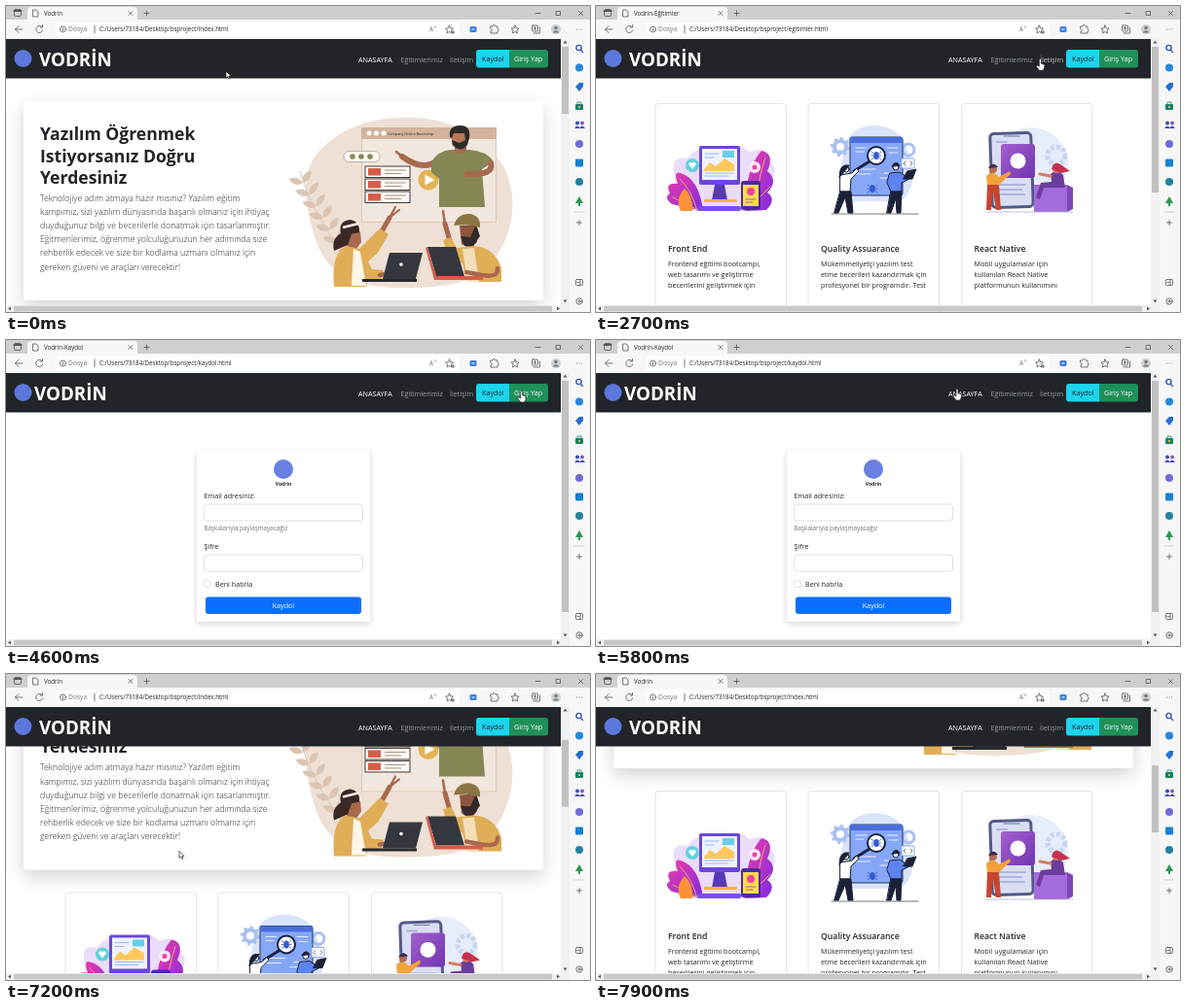
Animation, 600 px wide and 315 px high, one loop 8 s. Source, as an HTML page:

```html
<!DOCTYPE html>
<html lang="tr">
<head>
<meta charset="utf-8">
<title>Browser walkthrough</title>
<style>
  html, body { margin: 0; height: 100%; overflow: hidden; background: #fff; }
  svg { display: block; width: 600px; height: 315px; }
  text { font: 7.2px "Open Sans", "Noto Sans", sans-serif; fill: #212529; }
  .brand { font-size: 18.8px; font-weight: 700; fill: #fff; }
  .title text { font-size: 17.6px; font-weight: 700; }
  .lead text { font-size: 8.75px; font-weight: 300; fill: #212529; }
  .head { font-size: 8.7px; font-weight: 600; }
  .small { font-size: 6.2px; }
  .muted { fill: #6c757d; }
  .white { fill: #fff; }
  .nav { fill: #9b9d9f; }
  .line { fill: none; stroke: #555; stroke-width: .8; stroke-linecap: round; stroke-linejoin: round; }
  .skin { stroke: #a8694e; fill: none; stroke-linecap: round; stroke-linejoin: round; }
  .field { fill: #fff; stroke: #d5d9dd; stroke-width: .8; }
  .card { fill: #fff; stroke: #dfdfdf; stroke-width: .8; }
</style>
</head>
<body>
<svg viewBox="0 0 600 315">
  <defs>
    <clipPath id="view"><rect y="74" width="570" height="234"/></clipPath>
    <filter id="shadow" x="-20%" y="-20%" width="140%" height="150%">
      <feDropShadow dx="0" dy="7" stdDeviation="9" flood-opacity=".17"/>
    </filter>
    <filter id="softShadow" x="-20%" y="-20%" width="140%" height="140%">
      <feDropShadow dx="0" dy="2" stdDeviation="3" flood-opacity=".17"/>
    </filter>
    <linearGradient id="violet" x2="1" y2="1"><stop stop-color="#a45fd0"/><stop offset="1" stop-color="#7136ae"/></linearGradient>
    <linearGradient id="magenta" x2="1" y2="1"><stop stop-color="#f43ca8"/><stop offset="1" stop-color="#7a2be0"/></linearGradient>
    <path id="leaflet" d="M0 0C3-5 10-6 15-1 10 3 5 4 0 0Z"/>
  </defs>

  <rect width="600" height="315" fill="#fff"/>

  <g clip-path="url(#view)">
    <g id="hero">
      <rect x="18" y="98" width="534" height="205" rx="4" fill="#fff" filter="url(#shadow)"/>
      <g class="title"><text x="35" y="137.500">Yazılım Öğrenmek</text><text x="35" y="160.500">Istiyorsanız Doğru</text><text x="35" y="182.800">Yerdesiniz</text></g>
      <g class="lead" id="lead"></g>

      <path d="M308 182C309 148 352 116 404 115 453 113 490 132 510 163 529 197 521 241 495 268 478 288 441 290 405 290 365 290 335 279 322 250 313 229 308 207 308 182Z" fill="#eee0d4"/>
      <g id="fern" fill="#dac5b5"><path d="M302 170Q315 214 346 254" fill="none" stroke="#dac5b5"/></g>

      <rect x="365.500" y="125.500" width="138" height="97" fill="#f1e7de" stroke="#d8c3b2" stroke-width=".8"/>
      <rect x="365" y="125" width="139" height="12" fill="#d3b39d"/>
      <g fill="#fff"><circle cx="373" cy="131" r="2.500"/><circle cx="380.500" cy="131" r="2.500"/><circle cx="388" cy="131" r="2.500"/></g>
      <text x="392" y="132.500" style="font-size:3.700px">Company Online Bootcamp</text>
      <rect x="347" y="149.500" width="37" height="11" rx="5.500" fill="#fffaf4" stroke="#9a8c79" stroke-width=".6"/>
      <g fill="#878959"><circle cx="356" cy="155" r="2.800"/><circle cx="365" cy="155" r="2.800"/><circle cx="374" cy="155" r="2.800"/></g>
      <g id="rows"></g>
      <circle cx="434" cy="179" r="10.500" fill="#e3b355"/><path d="M430.500 173.500V184.500L440.500 179Z" fill="#fff"/>

      <path d="M442 160Q428 170 407 155" class="skin" stroke-width="6"/>
      <path d="M408 156L401 150" class="skin" stroke-width="2.500"/>
      <path d="M437 161Q443 149 457 148H476Q493 149 501 160L489 168 492 207H445V178L437 171Z" fill="#858755"/>
      <path d="M498 162Q502 174 474 173" class="skin" stroke-width="6"/>
      <path d="M461 144H473V149Q467 155 461 149Z" fill="#a8694e"/>
      <path d="M458 129H474V142Q466 154 458 142Z" fill="#b87858"/>
      <path d="M456 135Q454 124 465 123 478 122 476 136L474 143Q467 152 459 143L458 138 466 141 472 138 471 131H460L458 136Z" fill="#2e2a2a"/>

      <path d="M380 243L394 218" class="skin" stroke-width="5"/><path d="M394 218L400 207M394 218L404 210" class="skin" stroke-width="2.200"/>
      <path d="M353 236L364 232 365 243 358 253 350 248Z" fill="#a8694e"/>
      <path d="M337 252Q334 240 344 234 341 221 354 220 364 222 363 233L355 235 351 246Z" fill="#3a2826"/>
      <path d="M346 228L362 224" stroke="#fff3e4" stroke-width="2.500"/>
      <path d="M337 289Q334 254 349 247L363 250 384 229 393 235 382 254 372 263 376 271 388 272 386 281 371 283 370 289Z" fill="#e0ae57"/>
      <path d="M357 250L364 253 370 288H355Z" fill="#fff6e9"/>
      <path d="M384 277L392 276" class="skin" stroke-width="4.500"/>
      <path d="M394 254H428L421 281H387Z" fill="#34383e"/><path d="M366 281H422V284H366Z" fill="#262a30"/><circle cx="406" cy="266" r="1.800" fill="#fff"/>

      <path d="M456 242L451 224" class="skin" stroke-width="5"/><path d="M451 224L449 211" class="skin" stroke-width="2.500"/>
      <path d="M466 226L483 225 484 243 477 250 468 245Z" fill="#8e543e"/>
      <path d="M467 237L477 238 483 225 487 237 480 247 471 247Z" fill="#33292a"/>
      <path d="M460 226Q464 213 477 214 488 216 487 228L473 225Z" fill="#8b7643"/>
      <path d="M449 241L457 238 463 249 480 247Q502 248 509 270V284H474L469 265 455 260Z" fill="#e0ae57"/>
      <path d="M469 250L481 249 486 284H474Z" fill="#f2dfba"/>
      <path d="M505 270Q506 280 489 277L473 274" class="skin" stroke-width="4.500"/>
      <path d="M433 248H462L471 278H442Z" fill="#34383e"/><path d="M433 248L442 278H490V282H440L431 249Z" fill="#d45f4b"/>
    </g>

    <g id="cards">
      <g id="cardFrames"></g>

      <g id="frontArt">
        <path d="M80 190Q77 174 94 177 103 163 119 169 145 157 157 170 180 163 178 180 190 190 177 203L170 231H86Z" fill="#eadcfb"/>
        <g fill="url(#magenta)">
          <path d="M110 231Q106 198 87 192 79 189 84 203 70 201 76 213 69 217 78 224 76 231Z"/>
          <path d="M153 231Q153 188 170 169 184 172 176 190 188 200 176 212 186 219 175 230Z"/>
        </g>
        <path d="M104 231Q98 209 86 198M79 217L103 229M163 229Q167 196 174 176M163 222L179 206" class="line" style="stroke:#ffc24f"/>
        <path d="M87 231Q81 218 91 208 100 215 99 231Z" fill="#fb9138"/>
        <rect x="106" y="164" width="42" height="40" rx="2" fill="#6b46da"/><rect x="109" y="167" width="36" height="32" fill="#eef3ff"/>
        <path d="M112 172H126M112 176H121M112 192H141M112 195H136" class="line" style="stroke:#80a6ff"/>
        <path d="M111 188L117 181 123 185 132 177 142 183V190H111Z" fill="#ffc75d"/>
        <rect x="130" y="169" width="12" height="7" fill="#67cfe8"/>
        <path d="M122 204H132L135 220H119Z" fill="#553ab8"/><rect x="111" y="219" width="34" height="3" rx="1" fill="#ffb13d"/>
        <rect x="104" y="226" width="45" height="5" rx="2" fill="#7951e6"/>
        <rect x="149" y="200" width="20" height="30" rx="3" fill="#4a2c9e"/><rect x="151" y="204" width="16" height="22" fill="#ffdb4d"/><circle cx="159" cy="211" r="4" fill="#ee429d"/>
        <path d="M154 219H164M154 222H161" class="line" style="stroke:#8147d8"/>
        <circle cx="99" cy="184" r="7" fill="#62d3dd"/><path d="M99 188L95 183Q97 179 99 182 101 179 103 183Z" fill="#fff"/>
        <circle cx="163" cy="186" r="6" fill="#ffe8f6"/><circle cx="163" cy="186" r="2.500" fill="#ee429d"/>
      </g>

      <g id="testArt">
        <path d="M255 170Q258 145 284 143 313 143 320 168 334 204 313 221H258Q246 200 255 170Z" fill="#d9e4fb"/>
        <g fill="none" stroke="#a9c0f3"><circle cx="251" cy="165" r="6" stroke-width="4"/><circle cx="251" cy="165" r="8.500" stroke-width="3" stroke-dasharray="3 3.600"/><circle cx="321" cy="168" r="6" stroke-width="3"/></g>
        <rect x="261" y="155" width="54" height="60" rx="2" fill="#86a7f7" stroke="#25345e"/><rect x="261" y="155" width="54" height="6" fill="#4a6edb"/>
        <path d="M267 166H278M267 170H275M267 188H287M267 193H282M299 166H310M301 171H310M296 192H309M292 197H307" class="line" style="stroke:#fff"/>
        <path d="M281 180L265 190" class="line" style="stroke:#172242;stroke-width:3"/>
        <circle cx="288" cy="174" r="9" fill="#fff" stroke="#172242" stroke-width="2"/>
        <g id="bug"><ellipse cx="288" cy="174" rx="2.700" ry="4" fill="#355bd0"/><path d="M283 170L293 178M293 170L283 178M283 174H293" class="line" style="stroke:#355bd0"/></g>
        <use href="#bug" y="34" x="-4"/>
        <rect x="314" y="177" width="13" height="10" rx="1" fill="#fff" stroke="#8ea8ef"/><path d="M318 180L316 182 318 184.500M323 180L325 182 323 184.500" class="line"/>
        <path d="M242 234H331" class="line"/>
        <g class="line" style="stroke:#1b2137;stroke-width:1">
          <path d="M251 194L263 192 268 187 270 190 262 198 261 211H251Z" fill="#fff"/><path d="M251 211H262L264 233H259L256 217 249 233H245Z" fill="#1b2137"/>
          <circle cx="257" cy="188" r="3" fill="#fff"/><path d="M250 196Q250 182 260 184L258 187Z" fill="#1b2137"/>
          <path d="M302 192L312 191 322 198 314 202V211H303L299 202Z" fill="#5b84f0"/><path d="M303 211H314L313 233H309L308 218 303 233H299Z" fill="#1b2137"/>
          <circle cx="308" cy="186" r="3" fill="#fff"/><path d="M304 185Q308 178 312 184Z" fill="#1b2137"/>
          <path d="M320 190L329 188 325 198H316Z" fill="#1b2137"/>
        </g>
      </g>

      <g id="mobileArt">
        <circle cx="447" cy="183" r="38" fill="#e6edfb"/><circle cx="473" cy="174" r="9" fill="none" stroke="#c9d6ef" stroke-width="5" stroke-dasharray="4 2"/>
        <rect x="406" y="151" width="42" height="76" rx="4" fill="#d9def4" stroke="#535a86" stroke-width="3" transform="rotate(-2 427 189)"/><path d="M419 154H435" class="line" style="stroke:#535a86"/>
        <path d="M412 204H441M412 209H437M412 214H440M412 160H422" class="line" style="stroke:#aeb6dc;stroke-width:2"/>
        <rect x="416" y="162" width="35" height="35" rx="3" fill="url(#violet)"/><circle cx="433.500" cy="179.500" r="8" fill="#fff"/>
        <path d="M401 195Q407 188 414 196L425 190 426 193 414 204H402Z" fill="#f2a13a"/><circle cx="408" cy="188" r="4" fill="#b66b50"/><path d="M403 187Q408 179 413 186Z" fill="#382b51"/>
        <path d="M402 204H414L416 230H411L408 211 406 230H401Z" fill="#c7452e"/>
        <rect x="450" y="204" width="34" height="28" fill="#a46bdc"/><path d="M484 204L490 207V229L484 232Z" fill="#7e45b8"/>
        <path d="M467 193Q473 187 480 194L482 207H460L456 219 452 217 457 202 468 201Z" fill="#6b3d9a"/><path d="M467 195L456 193" class="line" style="stroke:#d77b68;stroke-width:3"/>
        <circle cx="473" cy="188" r="4" fill="#d77b68"/><path d="M468 188Q470 179 477 183L487 190 478 192Z" fill="#c7324a"/>
        <path d="M401 232H490" class="line" style="stroke:#aab2d2"/>
      </g>
    </g>

    <g id="signup">
      <rect x="196" y="114" width="178" height="176" rx="3" fill="#fff" filter="url(#softShadow)"/>
      <circle cx="285" cy="133" r="10" fill="#6880df"/>
      <text x="285" y="150" text-anchor="middle" style="font-size:5px;font-weight:700">Vodrin</text>
      <text x="203.500" y="162.500">Email adresiniz:</text><rect class="field" x="203.500" y="169" width="163" height="17" rx="3"/>
      <text x="203.500" y="195.800" class="muted" style="font-size:6.300px">Başkalarıyla paylaşmayacağız</text>
      <text x="203.500" y="214.500">Şifre</text><rect class="field" x="203.500" y="221" width="163" height="17" rx="3"/>
      <rect class="field" x="203.500" y="247.500" width="7" height="7" rx="2"/><text x="215" y="254">Beni hatırla</text>
      <rect x="205" y="264.500" width="160" height="17.500" rx="3" fill="#0d6efd"/><text x="285" y="276" text-anchor="middle" class="white">Kaydol</text>
    </g>
  </g>

  <rect y="34" width="570" height="40.500" fill="#212529"/>
  <circle cx="17.500" cy="54" r="9" fill="#5d77dc"/>
  <text id="brand" class="brand" y="61.500">VODRİN</text>
  <text x="362" y="57.500" class="white">ANASAYFA</text><text x="405.500" y="57.500" class="nav" id="courseLink">Eğitimlerimiz</text><text x="456" y="57.500" class="nav" id="contactLink">İletişim</text>
  <path d="M517 45H486Q483 45 483 48V60.500Q483 63.500 486 63.500H517Z" fill="#1dd3ee"/><path d="M517 45H554Q557 45 557 48V60.500Q557 63.500 554 63.500H517Z" fill="#20905a"/>
  <text x="489" y="57">Kaydol</text><text x="522" y="57" class="white">Giriş Yap</text>

  <rect width="600" height="15" fill="#cdcfd1"/><rect y="14" width="600" height="20" fill="#f7f7f7"/>
  <path d="M22 15V5Q22 1 26 1H131Q135 1 135 5V15Z" fill="#f7f7f7"/>
  <rect x="51" y="16.500" width="415" height="14.500" rx="3" fill="#fff"/>
  <g class="line">
    <rect x="8.500" y="3.500" width="7" height="7" rx="1.500"/><path d="M8.500 5H15.500" stroke-width="2"/>
    <path d="M126 5.500L130 9.500M130 5.500L126 9.500M142 7.500H147M144.500 5V10M544 7.500H549M588.500 5.500L592.500 9.500M592.500 5.500L588.500 9.500"/><rect x="565.500" y="5.500" width="4" height="4"/>
    <path d="M17 24H9.500M13 20.500L9.500 24 13 27.500"/>
    <circle cx="58.500" cy="24" r="3"/><path d="M58.500 23.500V25.500M58.500 22V22.100M91 20V28"/>
    <path id="star" d="M523 20L524.200 22.800 527 23 525 25 525.500 28 523 26.500 520.500 28 521 25 519 23 521.800 22.800Z"/>
    <use href="#star" x="-67.500"/><path d="M457.500 27H461M459.200 25.300V28.700"/>
    <path d="M498 21H500Q501 17.500 503 21H505V23.500Q508 25 505 26V28H498V26Q501 25 498 23.500Z"/>
    <rect x="540.500" y="20" width="6" height="6" rx="1"/><path d="M542 28H548.500V22M543.500 21.500V24.500M542 23H545"/>
    <path d="M586.500 24H586.600M589 24H589.100M591.500 24H591.600"/>
  </g>
  <rect id="translatePill" x="432" y="18.500" width="14" height="10" rx="4" fill="#d8dadc"/>
  <text x="435" y="26" class="small muted">A</text><text x="440" y="23" class="muted" style="font-size:4px">))</text>
  <rect x="476.500" y="21" width="7" height="6" rx="1.500" fill="#3c7fdf"/><path d="M478.500 24H481.500" stroke="#fff"/>
  <circle cx="565" cy="24" r="5" fill="#cfd2d4"/><circle cx="565" cy="22.500" r="1.800" fill="#747a80"/><path d="M561.500 27.500Q565 23 568.500 27.500Z" fill="#747a80"/>
  <g class="line" id="pageIcon"><path d="M28 4H31L33 6V11H28Z"/></g><circle id="spinner" cx="30" cy="7.500" r="1" fill="#777"/>
  <g class="line"><path id="reload" d="M37 21.500A3.600 3.600 0 1 0 37.800 25M37.500 19.500V22H35"/><path id="stop" d="M31 21L37 27M37 21L31 27"/></g>
  <text id="tab" class="small" x="39" y="9.800"></text><text x="64" y="26.200" class="muted" style="font-size:6.700px">Dosya</text><text id="address" class="small" x="96" y="26"></text>

  <rect x="570" y="34" width="9" height="274" fill="#f1f1f1"/><rect y="308" width="579" height="7" fill="#f1f1f1"/>
  <rect id="thumb" x="571" width="7" fill="#c1c1c1"/><rect x="8" y="308.800" width="553" height="5.700" fill="#c8c8c8"/>
  <path d="M572.500 38.500L574.500 35.500 576.500 38.500ZM572.500 302.500H576.500L574.500 305.500ZM5 309.500V313.500L2 311.500ZM566 309.500V313.500L569 311.500Z" fill="#5b5b5b"/>

  <rect x="579" y="33" width="21" height="282" fill="#f7f7f7"/>
  <g class="line" style="stroke:#3555bb;stroke-width:1.400"><circle cx="588.500" cy="43" r="2.600"/><path d="M590.500 45.500L592.500 47.500"/></g>
  <circle cx="589" cy="63.500" r="4" fill="#2787d8"/>
  <path d="M585 83L589 79H593V83L589 88Z" fill="#276fd0"/>
  <rect x="585" y="101" width="8" height="6" rx="1" fill="#12806a"/><path d="M587 101V99H591V101" class="line" style="stroke:#12806a"/><rect x="588" y="103" width="2" height="2" fill="#f2b343"/>
  <circle cx="587" cy="120.500" r="2" fill="#3050c0"/><circle cx="592" cy="120.500" r="2" fill="#8755c6"/><path d="M584 126Q587 121 590 126ZM589 126Q592 121 595 126Z" fill="#4a46b8"/>
  <circle cx="589" cy="142" r="4" fill="#716bd5"/><rect x="585" y="157.500" width="8" height="8" rx="1" fill="#1681d1"/><circle cx="589" cy="181" r="4" fill="#2481a0"/>
  <path d="M589 196L593 203H590V206H588V203H585Z" fill="#299750"/>
  <g class="line"><path d="M584 212H594" stroke-opacity=".3"/><path d="M586.500 223H591.500M589 220.500V225.500"/><rect x="585.500" y="281.500" width="7" height="6" rx="1"/><path d="M590 281.500V287.500M587 284.500H589"/>
    <circle cx="589" cy="304" r="1.100"/><circle cx="589" cy="304" r="3.200"/></g>

  <g id="cursor" stroke="#222" stroke-width=".7" fill="#fff" stroke-linejoin="round">
    <path id="arrow" d="M0 0V7L1.700 5.500 2.800 8 4 7.500 2.900 5.100H5Z"/>
    <path id="hand" d="M-1 0Q0-1.500 1 0V4L4.500 5Q5 8 3 11H-1L-4 7Q-3 5-1 7Z"/>
    <path id="beam" d="M-1.500-4.500H1.500M0-4.500V4.500M-1.500 4.500H1.500" fill="none" stroke-width="1"/>
  </g>
</svg>

<script>
const el = id => document.getElementById(id);
const show = (id, visible) => { el(id).style.display = visible ? "" : "none"; };
const lines = (rows, x, y, pitch) => rows.map((row, i) => `<text x="${x}" y="${y + i * pitch}">${row}</text>`).join("");

el("lead").innerHTML = lines([
  "Teknolojiye adım atmaya hazır mısınız? Yazılım eğitim",
  "kampımız, sizi yazılım dünyasında başarılı olmanız için ihtiyaç",
  "duyduğunuz bilgi ve becerilerle donatmak için tasarlanmıştır.",
  "Eğitmenlerimiz, öğrenme yolculuğunuzun her adımında size",
  "rehberlik edecek ve size bir kodlama uzmanı olmanız için",
  "gereken güveni ve araçları verecektir!"
], 35, 201, 14.1);

el("cardFrames").innerHTML = [
  [61, "Front End", ["Frontend eğitimi bootcampi,", "web tasarımı ve geliştirme", "becerilerini geliştirmek için"]],
  [218, "Quality Assuarance", ["Mükemmeliyetçi yazılım test", "etme becerileri kazandırmak için", "profesyonel bir programdır. Test"]],
  [375.5, "React Native", ["Mobil uygulamalar için", "kullanılan React Native", "platformunun kullanımını"]]
].map(([x, title, body]) => `<rect class="card" x="${x}" y="120.500" width="134.500" height="230" rx="3"/>
  <text class="head" x="${x + 13}" y="273">${title}</text>${lines(body, x + 13, 288, 11)}`).join("");

el("rows").innerHTML = [165, 178, 191].map(y => `<rect x="369" y="${y}" width="46" height="11.500" fill="#fffaf5" stroke="#443b37"/>
  <rect x="372" y="${y + 2}" width="13" height="7.500" fill="#d65e49"/>
  <path d="M389 ${y + 4}H411M389 ${y + 7.5}H406" stroke="#a8907d"/>`).join("");

for (let i = 0; i < 6; i++) {
  const x = 305 + i * 7, y = 182 + i * 12;
  for (const angle of [-50, 200])
    el("fern").insertAdjacentHTML("beforeend", `<use href="#leaflet" transform="translate(${x} ${y}) rotate(${angle})"/>`);
}

// Each move holds: first step, last step, destination.
const cursorMoves = [
  [500, 600, 260, 75], [800, 1200, 424.5, 56], [2600, 2900, 467, 55],
  [3100, 3400, 500, 53], [4200, 5000, 537, 53], [5200, 5500, 405, 58],
  [5700, 5800, 371, 51], [6300, 6300, 205, 165], [6800, 6900, 183, 184], [7200, 7400, 174, 181]
];
const scrollMoves = [[6800, 7000, 88], [7200, 7500, 119], [7700, 7900, 206]];

function follow(start, moves, time) {
  let position = start;
  for (const [first, last, ...goal] of moves) {
    if (time < first) break;
    const p = Math.min(1, (time - first + 100) / (last - first + 100));
    const ease = 1 - (1 - p) ** 2;
    position = position.map((value, i) => value + (goal[i] - value) * ease);
  }
  return position;
}

const pages = {
  home: { file: "index", title: "Vodrin", thumb: 69 },
  courses: { file: "egitimler", title: "Vodrin-Eğitimler", thumb: 150 },
  signup: { file: "kaydol", title: "Vodrin-Kaydol", thumb: 238 }
};
// Page, time its loading starts, time it appears.
const visits = [["home", 0, 0], ["courses", 1600, 1800], ["signup", 3400, 3500], ["home", 6100, 6200]];

function render(time) {
  const name = visits.findLast(visit => time >= visit[2])[0];
  const [upcoming, , arrival] = visits.findLast(visit => time >= visit[1]);
  const loading = time < arrival;
  const page = pages[name], target = pages[upcoming];
  const [scroll] = follow([0], scrollMoves, time);
  const [x, y] = follow([226, 67], cursorMoves, time);

  show("hero", name === "home");
  show("cards", name !== "signup");
  show("signup", name === "signup");
  el("hero").setAttribute("transform", `translate(0 ${-scroll})`);
  el("cards").setAttribute("transform", `translate(0 ${name === "home" ? 206 - scroll : -20})`);
  el("thumb").setAttribute("y", 42 + scroll * .253);
  el("thumb").setAttribute("height", page.thumb);
  el("brand").setAttribute("x", name === "signup" ? 29 : 34);

  el("tab").textContent = loading ? target.file + ".html" : page.title;
  el("address").textContent = `C:/Users/73184/Desktop/bsproject/${target.file}.html`;
  show("stop", loading);
  show("reload", !loading);
  show("spinner", loading);
  show("pageIcon", !loading);
  show("translatePill", time >= 3500 && time < 4000);

  const onNav = y < 64 && x > 362 && x < 557;
  el("courseLink").style.fill = onNav && x > 405 && x < 449 ? "#c8c9ca" : "";
  el("contactLink").style.fill = onNav && x > 456 && x < 481 ? "#c8c9ca" : "";
  const onText = time >= 6800 && time < 7200;
  el("cursor").setAttribute("transform", `translate(${x} ${y})`);
  show("cursor", time < 7700);
  show("hand", onNav);
  show("beam", onText);
  show("arrow", !onNav && !onText);
}

function tick() {
  render(Math.floor(performance.now() % 8000 / 100) * 100);
  requestAnimationFrame(tick);
}
tick();
</script>
</body>
</html>
```
